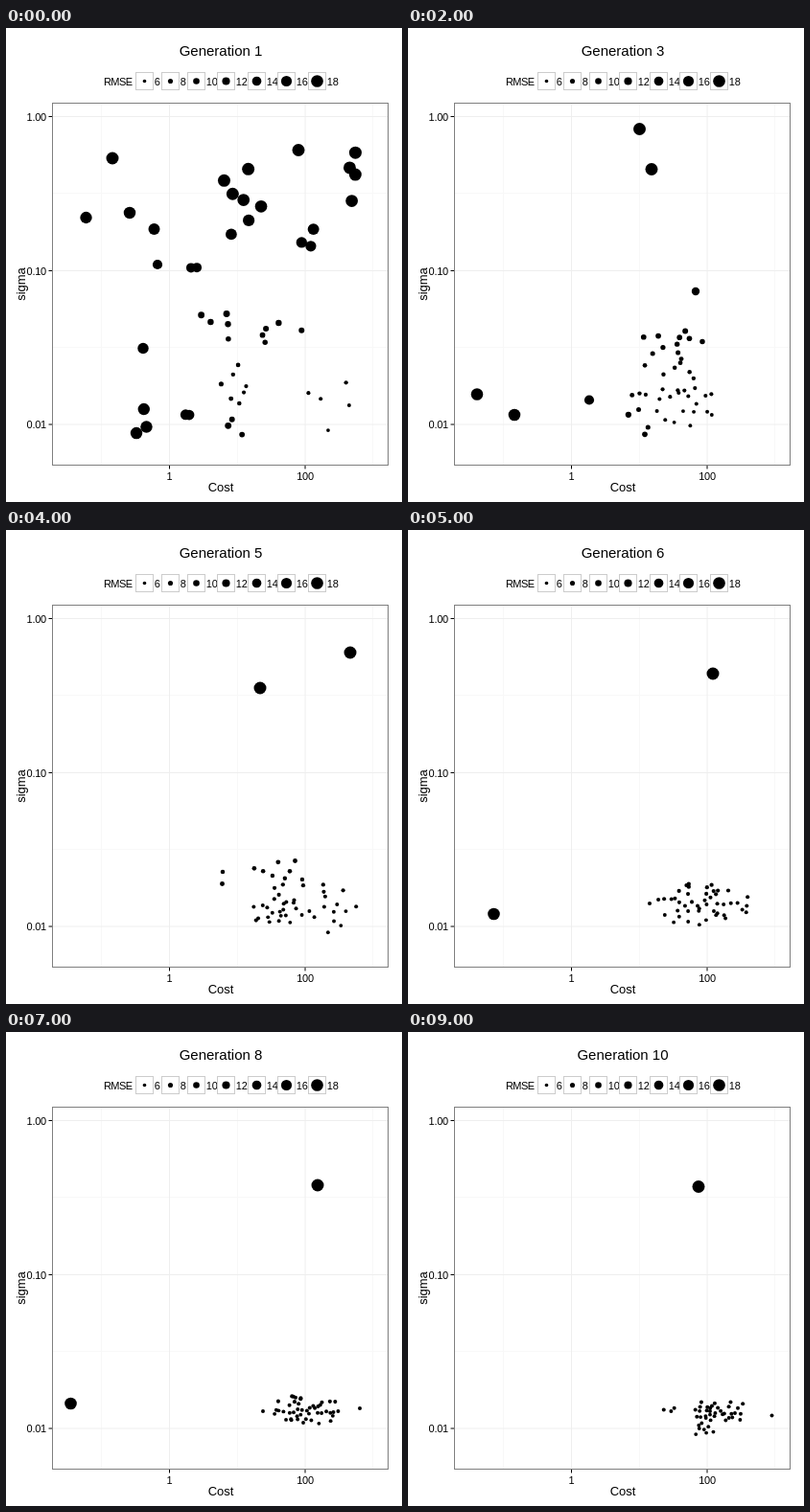
Recreate the animation shown at these times as an HTML page. Size 413 by 495 pixels, loop 10000 ms.

```html
<!DOCTYPE html>
<html lang="en">
<head>
<meta charset="utf-8">
<title>Generations</title>
<style>
html, body { margin: 0; width: 100%; height: 100%; overflow: hidden; background: #fff; }
svg { display: block; width: 100%; height: 100%; }
text { font-family: "Liberation Sans", Arial, sans-serif; font-size: 11px; letter-spacing: -.25px; }
.big { font-size: 15px; letter-spacing: 0; }
.axis { font-size: 13px; letter-spacing: 0; }
</style>
</head>
<body>
<svg id="plot" viewBox="0 0 413 495"></svg>
<script>
const NS = 'http://www.w3.org/2000/svg';
const STEP = 1000;
const LEFT = 48.5, TOP = 78.5, RIGHT = 398.5, BOTTOM = 456.5;
const svg = document.getElementById('plot');

function add(parent, tag, attrs, label) {
  const el = document.createElementNS(NS, tag);
  for (const k in attrs) el.setAttribute(k, attrs[k]);
  if (label !== undefined) el.textContent = label;
  parent.append(el);
  return el;
}
const line = (x1, y1, x2, y2, stroke) => add(svg, 'line', { x1, y1, x2, y2, stroke });
const dot = (parent, cx, cy, r) => add(parent, 'circle', { cx, cy, r });
const box = (x, y, width, height, stroke) => add(svg, 'rect', { x, y, width, height, stroke, fill: 'none' });
const text = (x, y, anchor, label, cls = '') =>
  add(svg, 'text', { x, y, 'text-anchor': anchor, class: cls }, label);

// Error grows with sigma, and towards low cost
const fall = (v, mid, scale) => 1 / (1 + Math.exp((v - mid) / scale));
function radius(x, y) {
  const bySigma = 1.8 + 5 * fall(y, 272, 38);
  const byCost = 1.7 + 4.6 * fall(x - .55 * (y - 330), 175, 18);
  return Math.min(6.5, Math.max(bySigma, byCost));
}

function random(seed) {
  return () => {
    seed = (seed + 0x6D2B79F5) | 0;
    let t = Math.imul(seed ^ seed >>> 15, 1 | seed);
    t = t + Math.imul(t ^ t >>> 7, 61 | t) ^ t;
    return ((t ^ t >>> 14) >>> 0) / 4294967296;
  };
}

// n dots in an ellipse: a jittered spiral keeps them apart
function cloud(rnd, [n, cx, cy, rx, ry]) {
  return Array.from({ length: n }, (_, i) => {
    const r = ((i + rnd()) / n) ** .6, a = i * 2.4 + rnd() * 1.2;
    return [cx + r * rx * Math.cos(a), cy + r * ry * Math.sin(a)];
  });
}

// Panel
for (const x of [99.5, 241.5, 382.5]) line(x, TOP, x, BOTTOM, '#f8f8f8');
for (const y of [172.5, 333.5]) line(LEFT, y, RIGHT, y, '#f8f8f8');
for (const [x, label] of [[170.5, '1'], [312, '100']]) {
  line(x, TOP, x, BOTTOM, '#eee');
  line(x, 457, x, 460.5, '#000');
  text(x, 472, 'middle', label);
}
for (const [y, label] of [[92.5, '1.00'], [253.5, '0.10'], [414, '0.01']]) {
  line(LEFT, y, RIGHT, y, '#eee');
  line(44.5, y, 48, y, '#000');
  text(42, y + 4, 'end', label);
}
box(LEFT, TOP, RIGHT - LEFT, BOTTOM - TOP, '#7f7f7f');

// Titles
const title = text(224, 29, 'middle', '', 'big');
text(224, 484, 'middle', 'Cost', 'axis');
text(0, 0, 'middle', 'sigma', 'axis').setAttribute('transform', 'translate(20 267.5) rotate(-90)');

// Legend
text(102, 60, 'start', 'RMSE').style.letterSpacing = '-.6px';
[144.5, 171.5, 198.5, 229.5, 261.5, 292.5, 324.5].forEach((x, i) => {
  box(x - 9, 46.5, 18, 18, '#ccc');
  dot(svg, x, 55.5, 1.8 + .76 * i);
  text(x + 10.3, 60, 'start', 6 + 2 * i);
});

// Each generation: a few outliers, then clouds as [count, x, y, rx, ry]
const gens = [];
function generation(outliers, ...clouds) {
  const g = add(svg, 'g', { display: 'none' });
  const rnd = random(gens.push(g));
  const points = outliers.concat(...clouds.map(c => cloud(rnd, c)));
  for (const [x, y] of points) dot(g, x, y, radius(x, y));
}

generation(
  [[111, 136], [83.5, 198], [129, 193], [154.5, 210], [158, 247], [143, 334.5], [305, 127.5]],
  [4, 362, 153, 7, 30], [7, 246, 170, 25, 55], [3, 317, 227, 13, 21], [2, 197, 249.5, 5, 2],
  [10, 257, 312, 80, 18], [10, 240, 388, 18, 42], [3, 142, 415, 9, 20], [2, 190, 403, 3, 7], [5, 348, 393, 38, 38]);
generation(
  [[157, 196.5], [353, 172.5], [341.5, 187.5], [268.5, 248], [330, 257], [153, 341], [166.5, 370], [151, 393], [149, 436]],
  [15, 260, 310, 80, 36], [25, 272, 387, 62, 32]);
generation(
  [[241.5, 105.5], [254, 147.5], [300, 275], [189, 388.5], [72, 382.5], [111, 404]],
  [12, 274, 330, 36, 21], [17, 257, 385, 34, 42], [14, 298, 388, 22, 32]);
generation([[310, 152], [226, 396]], [47, 288, 382, 58, 46]);
generation(
  [[265, 165], [359, 128], [226, 357], [225.5, 369.5]],
  [11, 287, 361, 34, 18], [22, 282, 398, 28, 18], [14, 338, 396, 28, 28]);
generation([[89.5, 401], [318, 150], [252, 390]], [46, 308, 391, 50, 24]);
generation(
  [[332, 176], [306.5, 272], [269, 397.5]],
  [30, 307, 399, 20, 23], [12, 332, 386, 26, 8], [3, 365, 401, 4, 9]);
generation([[67.5, 388], [325, 160], [268, 396], [369, 393]], [45, 313, 395, 36, 17]);
generation(
  [[320.5, 165.3], [113, 391], [144.5, 384], [109.5, 415.5], [191.5, 406], [270, 395], [277.5, 390]],
  [26, 309, 395, 14, 9], [7, 334, 391, 18, 2], [7, 308, 412, 16, 9]);
generation(
  [[303, 161.5], [379.5, 400.5]],
  [3, 273, 395, 9, 3], [21, 314, 396, 16, 11], [12, 340, 396, 12, 14], [8, 308, 415, 14, 7]);

let shown = -1;
function draw(t) {
  const i = Math.floor(t / STEP) % gens.length;
  if (i === shown) return;
  shown = i;
  gens.forEach((g, k) => g.setAttribute('display', k === i ? 'inline' : 'none'));
  title.textContent = `Generation ${i + 1}`;
}

let start;
function tick(now) {
  start ??= now;
  draw(Math.max(0, now - start));
  requestAnimationFrame(tick);
}
draw(0);
requestAnimationFrame(tick);
</script>
</body>
</html>
```
